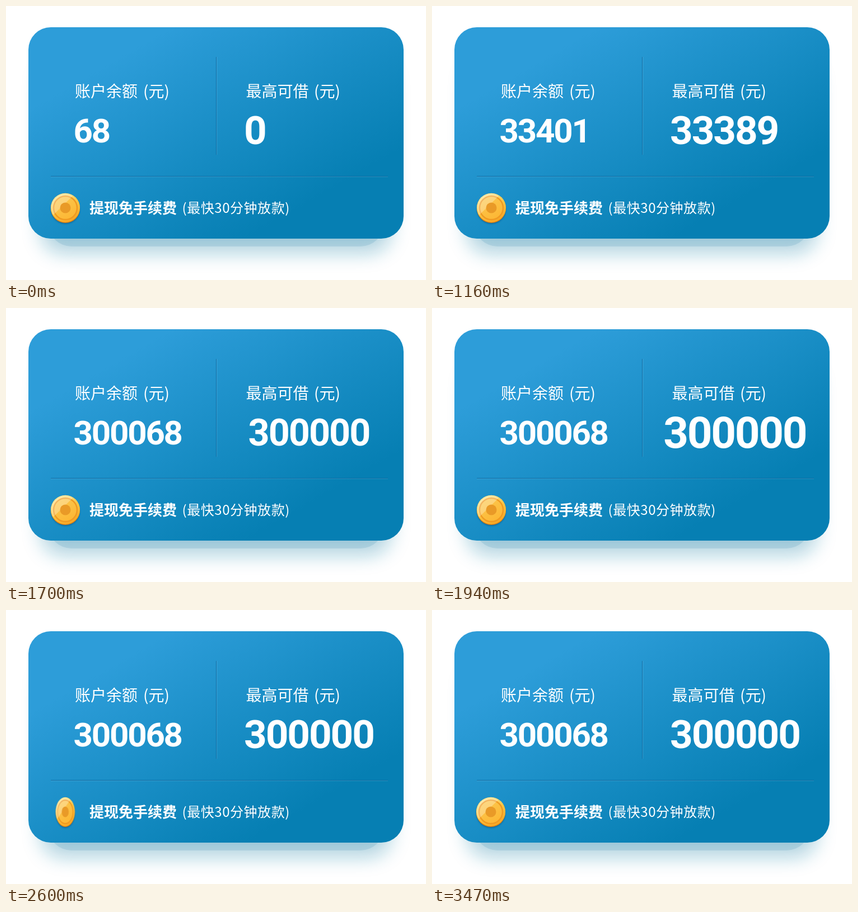
Animation, 750 px wide and 490 px high, one loop 4.87 s. Source, as an HTML page:

```html
<!DOCTYPE html>
<html lang="zh-CN">
<head>
<meta charset="utf-8">
<title>账户余额</title>
<style>
  html, body { margin: 0; width: 100%; height: 100%; overflow: hidden; background: #fff; }
  svg { display: block; width: 750px; height: 490px; }
  text { fill: #fff; font-family: "Noto Sans CJK SC", "Noto Sans CJK", sans-serif; }
  .label { font-size: 28px; }
  .offer { font-size: 26px; font-weight: 700; }
  .note { font-size: 24px; letter-spacing: .55px; }
  .amount { font-family: Roboto, sans-serif; font-weight: 700; }
  #balance { font-size: 60px; letter-spacing: -2.2px; }
  #limit { font-size: 71px; letter-spacing: -2.1px; }

  .pulse { transform-origin: 541.5px 222px; animation: pulse 4870ms infinite; }
  .coin { transform-origin: 106px 361px; animation: flip 4870ms infinite; }

  @keyframes pulse {
    0%     { transform: scale(1); animation-timing-function: step-end; }
    34.9%  { transform: scale(.935); animation-timing-function: step-end; }
    35.52% { transform: scale(.9); animation-timing-function: steps(7); }
    39.83% { transform: scale(1.1); animation-timing-function: steps(3); }
    41.68% { transform: scale(1.19); animation-timing-function: steps(4); }
    44.14%, 100% { transform: scale(1); }
  }
  @keyframes flip {
    0%     { transform: translateX(0) scaleX(1); animation-timing-function: step-end; }
    49.69% { transform: translateX(0) scaleX(1); animation-timing-function: steps(17); }
    60.16% { transform: translateX(-.5px) scaleX(.03); animation-timing-function: steps(18); }
    71.25%, 100% { transform: translateX(-1px) scaleX(1); }
  }
</style>
</head>
<body>
<svg viewBox="0 0 750 490">
  <defs>
    <linearGradient id="blue" gradientUnits="userSpaceOnUse" x1="90" y1="156" x2="287" y2="498">
      <stop stop-color="#2d9dd9"/>
      <stop offset="1" stop-color="#067fb3"/>
    </linearGradient>
    <linearGradient id="rim" x1=".25" y1="0" x2=".75" y2="1">
      <stop stop-color="#ffe694"/>
      <stop offset=".5" stop-color="#fcc544"/>
      <stop offset="1" stop-color="#f7a420"/>
    </linearGradient>
    <linearGradient id="face" x1=".2" y1="0" x2=".8" y2="1">
      <stop stop-color="#fbc850"/>
      <stop offset="1" stop-color="#fdb632"/>
    </linearGradient>
    <filter id="soft" x="-20%" y="-30%" width="140%" height="160%">
      <feGaussianBlur stdDeviation="17"/>
    </filter>
    <filter id="small" x="-20%" y="-20%" width="140%" height="140%">
      <feGaussianBlur stdDeviation="1.5"/>
    </filter>
    <clipPath id="disc"><circle cx="106" cy="361" r="25.5"/></clipPath>
  </defs>

  <!-- Card and shadow -->
  <rect x="62" y="100" width="626" height="342" rx="40" fill="#0a7aa0" opacity=".33" filter="url(#soft)"/>
  <rect x="75" y="330" width="600" height="100" rx="42" fill="#0a6f98" opacity=".12"/>
  <rect x="40" y="38" width="670" height="378" rx="40" fill="url(#blue)"/>

  <!-- Dividers -->
  <path d="M375.5 91V266M80 304.5H682" stroke="#0b6ca5"/>
  <path d="M376.5 91V266M80 305.5H682" stroke="#fff" opacity=".14"/>

  <text class="label" x="123" y="163">账户余额<tspan x="245">(元)</tspan></text>
  <text class="label" x="428.5" y="163">最高可借<tspan x="550">(元)</tspan></text>
  <text class="amount" id="balance" x="120.5" y="244">68</text>
  <g class="pulse"><text class="amount" id="limit" x="425" y="247.3">0</text></g>

  <text class="offer" x="149" y="371">提现免手续费</text>
  <text class="note" x="314.5" y="370">(最快30分钟放款)</text>

  <g class="coin">
    <circle cx="106" cy="364" r="25.5" fill="#0a4d78" opacity=".6" filter="url(#small)"/>
    <circle cx="106" cy="362" r="26" fill="#dc7c10"/>
    <circle cx="106" cy="360.7" r="26" fill="url(#rim)"/>
    <circle cx="106" cy="361" r="21" fill="url(#face)" stroke="#f09a22" stroke-width="2.5"/>
    <path d="M76 382V331H128Z" fill="#fff" opacity=".28" clip-path="url(#disc)"/>
    <circle cx="106" cy="361" r="9.5" fill="#e99a27"/>
  </g>
</svg>
<script>
  const LOOP = 4870, START = 670, STEP = 70, LAST = 15, TOTAL = 300000;
  const balance = document.getElementById('balance');
  const limit = document.getElementById('limit');

  // Accelerating count; halfGain is the amount added by the middle step.
  function countAt(step, halfGain) {
    if (step < 1) return 0;
    if (step >= LAST) return TOTAL;
    return Math.round(1667 + halfGain * ((step - 1) / 7) ** 3.236);
  }

  function show(node, value) {
    const text = String(value);
    if (node.textContent !== text) node.textContent = text;
  }

  let origin;
  function draw(now) {
    origin ??= now;
    const time = (now - origin) % LOOP;
    const step = Math.floor((time - START) / STEP) + 1;
    show(balance, 68 + countAt(step, 31666));
    show(limit, countAt(step, 31722));
    requestAnimationFrame(draw);
  }
  requestAnimationFrame(draw);
</script>
</body>
</html>
```
